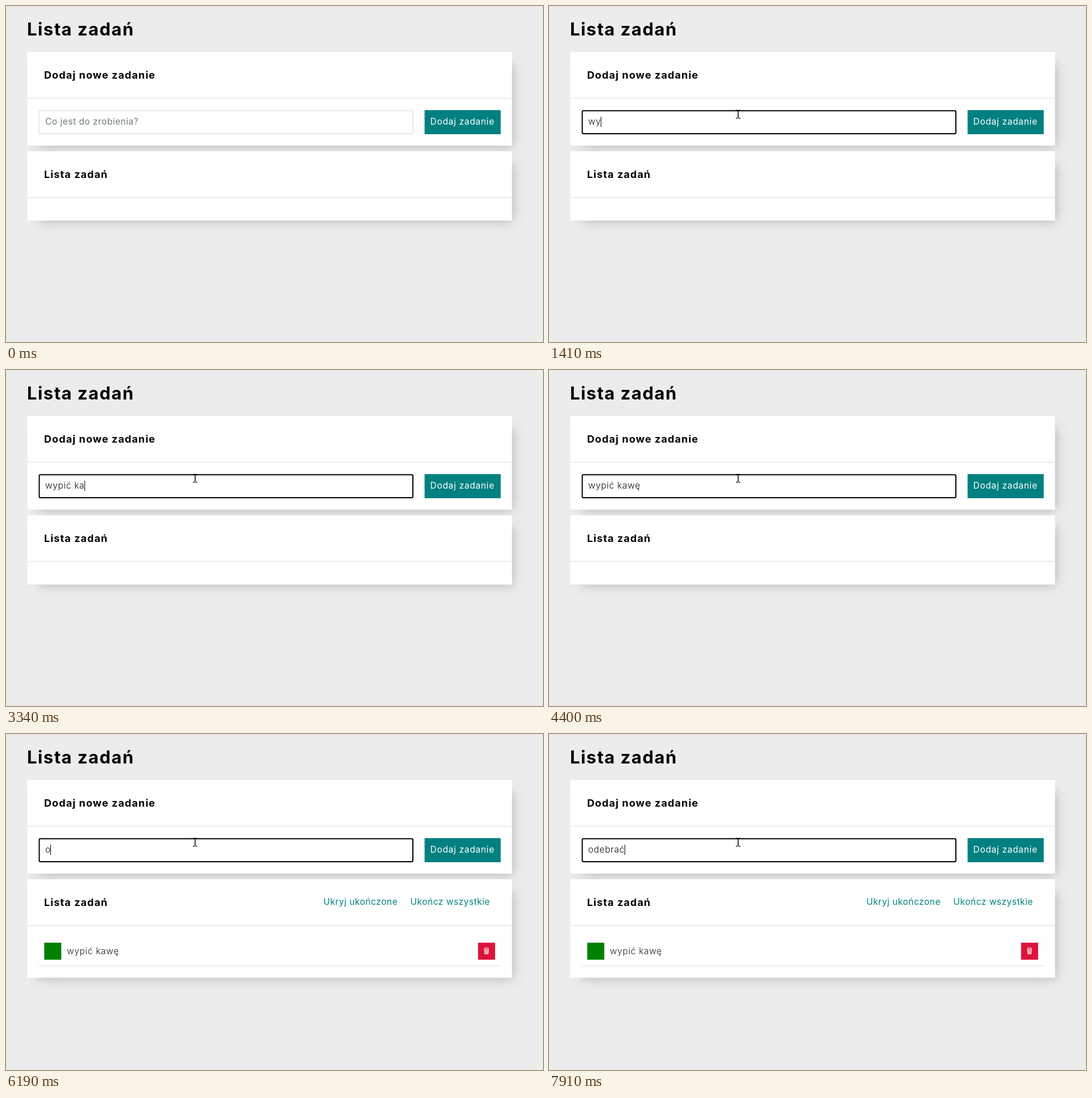
Write an HTML page with a canvas that moves like this. It is 945x592 px and loops after 8 s.

```html
<!DOCTYPE html>
<html lang="pl">
<head>
<meta charset="utf-8">
<title>Lista zadań</title>
<style>
  html, body { margin: 0; width: 100%; height: 100%; overflow: hidden; background: #ececec; }
  canvas { display: block; width: 945px; height: 592px; }
</style>
</head>
<body>
<canvas id="stage" width="945" height="592"></canvas>
<script>
const ctx = document.getElementById('stage').getContext('2d');

const LOOP = 8000;
const BLINK = 530;
const CLICK = 550;
const SUBMIT = 4730;
const TEAL = '#008080';
const LINE = '#ececec';
const TASK = 'wypić kawę';

// Key press times for each word being typed
const typing = [
  { word: TASK, keys: [1210, 1410, 1870, 2130, 2460, 2940, 3140, 3340, 3470, 3870], end: SUBMIT },
  { word: 'odebrać', keys: [6190, 6530, 6720, 7120, 7450, 7580, 7910], end: LOOP }
];

const styles = {
  title: { font: '700 31px', gap: 1.45 },
  head: { font: '700 18px', gap: 1.1 },
  body: { font: '400 15.5px', gap: 0.5 },
  button: { font: '400 15.5px', gap: 0.7 },
  light: { font: '300 15.5px', gap: 0.65 }
};

function useStyle(name) {
  ctx.font = styles[name].font + ' Inter, "Open Sans", sans-serif';
  ctx.letterSpacing = styles[name].gap + 'px';
}

function text(str, x, y, style, color = '#000') {
  useStyle(style);
  ctx.fillStyle = color;
  ctx.fillText(str, x, y);
}

function box(x, y, w, h, color) {
  ctx.fillStyle = color;
  ctx.fillRect(x, y, w, h);
}

function card(y, h, heading) {
  const x = 37.5, w = 853, inset = 10;
  ctx.save();
  ctx.shadowColor = '#b0b0b5';
  ctx.shadowBlur = 20;
  ctx.shadowOffsetX = ctx.shadowOffsetY = 10;
  box(x + inset, y + inset, w - 2 * inset, h - 2 * inset, '#fff');
  ctx.restore();
  box(x, y, w, h, '#fff');
  box(x, y + 80.5, w, 2, LINE);
  text(heading, 67, y + 46.5, 'head');
}

function typedAt(t) {
  for (const { word, keys, end } of typing) {
    const count = keys.filter(k => k <= t).length;
    if (count && t < end) return { str: word.slice(0, count), since: keys[count - 1] };
  }
  return { str: '', since: t < SUBMIT ? CLICK : 3870 };
}

function input(t) {
  const focused = t >= CLICK;
  ctx.lineWidth = 2;
  ctx.strokeStyle = focused ? '#000' : '#e8e8e8';
  ctx.beginPath();
  ctx.roundRect(58.5, 184.4, 657.5, 40.5, focused ? 2 : 0);
  ctx.stroke();

  const { str, since } = typedAt(t);
  if (str) text(str, 69, 209, 'light', '#111');
  else text('Co jest do zrobienia?', 69, 209, 'body', '#6f7a7a');

  if (focused && Math.floor((t - since) / BLINK) % 2 === 0) {
    useStyle('light');
    const x = str ? Math.round(68.6 + ctx.measureText(str).width) : 69;
    box(x, 195, 1, str ? 18 : 19, '#000');
  }
}

function trash() {
  box(830.7, 367.7, 30, 30, '#dc143c');
  ctx.strokeStyle = '#fff';
  ctx.lineWidth = 1;
  ctx.beginPath();
  ctx.ellipse(845.5, 378, 4, 1.3, 0, 0, 7);
  ctx.moveTo(841.7, 378.5);
  ctx.lineTo(842.7, 387.5);
  ctx.lineTo(848.3, 387.5);
  ctx.lineTo(849.3, 378.5);
  ctx.stroke();
  ctx.lineWidth = 0.7;
  ctx.beginPath();
  for (const dx of [-1.5, 0, 1.5]) {
    ctx.moveTo(845.5 + dx * 1.2, 379.5);
    ctx.lineTo(845.5 + dx, 387);
  }
  for (const y of [382, 384.5]) {
    ctx.moveTo(842.2, y);
    ctx.lineTo(848.8, y);
  }
  ctx.stroke();
}

function arrow(x, y) {
  ctx.beginPath();
  ctx.moveTo(x, y);
  [[0, 16.5], [3.8, 13], [6.2, 18.5], [8.8, 17.4], [6.5, 12], [11.8, 11.8]]
    .forEach(([dx, dy]) => ctx.lineTo(x + dx, y + dy));
  ctx.closePath();
  ctx.fillStyle = '#fff';
  ctx.fill();
  ctx.strokeStyle = '#000';
  ctx.lineWidth = 1;
  ctx.stroke();
}

function beam(x, y) {
  box(x, y - 6, 1.5, 13, '#000');
  for (const dy of [-7, 7]) {
    box(x - 3, y + dy, 3, 1.4, '#000');
    box(x + 1.5, y + dy, 3, 1.4, '#000');
  }
}

function pointer(t) {
  if (t < 70) return;
  // The pointer is sampled every 70 ms
  const p = Math.min(1, (Math.floor(t / 70) * 70 - 70) / 410);
  const e = p * p * (3 - 2 * p);
  const x = Math.round(848 + (332 - 848) * e);
  const y = Math.round(580 + (190 - 580) * e);
  if (t >= CLICK && t < 620) {
    ctx.fillStyle = 'rgba(255, 255, 0, 0.62)';
    ctx.beginPath();
    ctx.arc(x - 1.5, y, 11.5, 0, 7);
    ctx.fill();
  }
  if (y < 226) beam(x, y);
  else arrow(x + 0.5, y + 0.5);
}

function draw(t) {
  const added = t >= SUBMIT;
  box(0, 0, 945, 592, '#ececec');
  text('Lista zadań', 37, 51.5, 'title');

  card(81, 165, 'Dodaj nowe zadanie');
  card(256, added ? 173.5 : 122, 'Lista zadań');

  input(t);
  box(736.6, 183.4, 134, 42.5, TEAL);
  text('Dodaj zadanie', 746.5, 209, 'button', '#fff');

  if (added) {
    text('Ukryj ukończone', 558.5, 300.5, 'body', TEAL);
    text('Ukończ wszystkie', 711.5, 300.5, 'body', TEAL);
    box(67.3, 367.7, 30, 30, '#008000');
    text(TASK, 107, 388, 'light', '#222');
    trash();
    box(57.5, 407.5, 813, 2, LINE);
  }
  pointer(t);
}

const start = performance.now();
function tick() {
  draw((performance.now() - start) % LOOP);
  requestAnimationFrame(tick);
}
tick();
</script>
</body>
</html>
```
